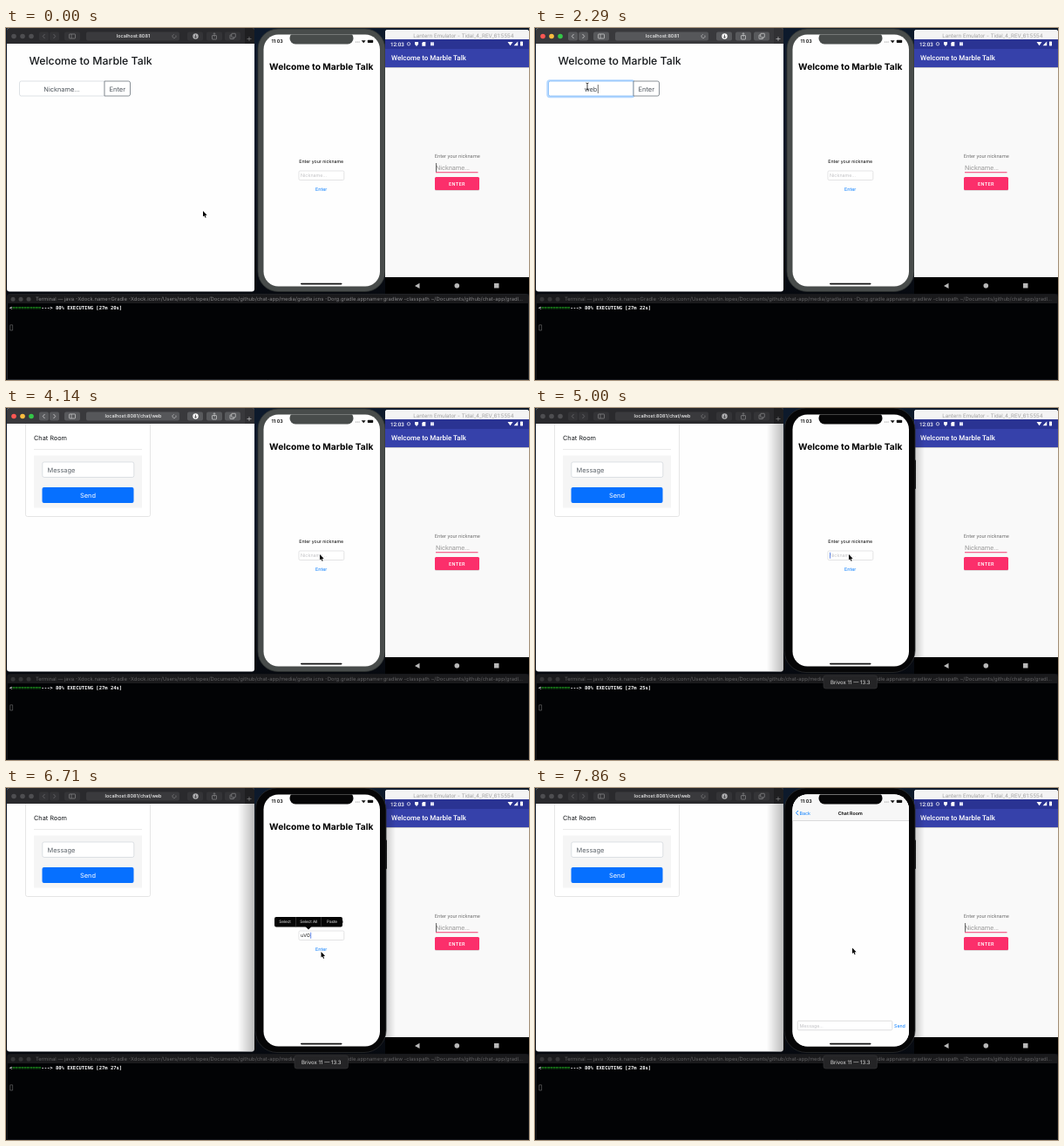
Recreate the animation shown at these times as an HTML page with a canvas. Size 600 by 404 pixels, loop 8 s.

```html
<!DOCTYPE html>
<html lang="en">
<head>
<meta charset="utf-8">
<title>Chat on three screens</title>
<style>
html, body { margin: 0; width: 600px; height: 404px; overflow: hidden; background: #05070c; }
canvas { display: block; width: 600px; height: 404px; }
</style>
</head>
<body>
<canvas></canvas>
<script>
const canvas = document.querySelector('canvas');
const ctx = canvas.getContext('2d');
const ratio = window.devicePixelRatio || 1;
canvas.width = 600 * ratio;
canvas.height = 404 * ratio;
ctx.textRendering = 'geometricPrecision';

const LOOP = 8000, STEP = LOOP / 56;
const SANS = 'Inter, sans-serif', ROBOTO = 'Roboto, sans-serif', MONO = '"DejaVu Sans Mono", monospace';
const WELCOME = 'Welcome to Marble Talk';
const BLUE = '#007aff';

// Moments of the session, in ms
const browserFocus = 1000, fieldFocus = 1420, chatOpen = 3420, phoneFocus = 4280, phoneTap = 4560;
const menuOpen = 6280, pushStart = 6850, pushEnd = 7420;

// Pointer path: time, x, y
const path = [
  [140, 226, 210], [1000, 60, 67], [2570, 60, 67], [2990, 128, 69], [3420, 128, 69],
  [3990, 360, 168], [6280, 360, 168], [6570, 361.5, 188], [7000, 361.5, 188], [7420, 364, 183.5]
];

const clamp = v => Math.min(1, Math.max(0, v));
const ease = v => v * v * (3 - 2 * v);
const typed = (word, times, t) => word.slice(0, times.filter(at => t >= at).length);

function box(x, y, w, h, fill, r = 0, stroke, line = 0.7) {
  ctx.beginPath();
  ctx.roundRect(x, y, w, h, r);
  if (fill) { ctx.fillStyle = fill; ctx.fill(); }
  if (stroke) { ctx.strokeStyle = stroke; ctx.lineWidth = line; ctx.stroke(); }
}

function dot(x, y, r, fill, stroke) {
  box(x - r, y - r, 2 * r, 2 * r, fill, r, stroke);
}

function poly(points, fill, stroke, line = 0.8) {
  ctx.beginPath();
  for (let i = 0; i < points.length; i += 2) ctx.lineTo(points[i], points[i + 1]);
  if (fill) { ctx.closePath(); ctx.fillStyle = fill; ctx.fill(); }
  if (stroke) { ctx.strokeStyle = stroke; ctx.lineWidth = line; ctx.stroke(); }
}

// y is the middle of the capitals
function text(s, x, y, size, color, { font = SANS, weight = 400, align = 'left', spacing = 0 } = {}) {
  ctx.font = `${weight} ${size}px ${font}`;
  ctx.textAlign = align;
  ctx.letterSpacing = spacing + 'px';
  ctx.fillStyle = color;
  ctx.fillText(s, x, y + size * 0.36);
  return ctx.measureText(s).width;
}

const middle = (s, x, y, size, color, weight) => text(s, x, y, size, color, { align: 'center', weight });

function fade(x0, x1, y, h, from, to) {
  const g = ctx.createLinearGradient(x0, 0, x1, 0);
  g.addColorStop(0, from);
  g.addColorStop(1, to);
  box(Math.min(x0, x1), y, Math.abs(x1 - x0), h, g);
}

function desktop() {
  const g = ctx.createLinearGradient(0, 0, 0, 310);
  g.addColorStop(0, '#0d1a2c');
  g.addColorStop(0.5, '#121a28');
  g.addColorStop(1, '#06090f');
  box(0, 0, 600, 404, g);
}

function toolbar(t) {
  const active = t >= browserFocus && t < phoneFocus;
  const icon = active ? '#d4d4d5' : '#8a8a8c', button = active ? '#58595c' : '#343437';
  box(1, 0, 284, 18, active ? '#39393c' : '#2a2a2d', [3, 3, 0, 0]);
  ['#fc5753', '#fdbc40', '#34c648'].forEach((color, i) => dot(9 + i * 10, 9.5, 2.8, active ? color : '#4e4e51'));
  box(38, 4.5, 11, 10, button, 2);
  box(50, 4.5, 11, 10, button, 2);
  poly([44.5, 7, 42.3, 9.5, 44.5, 12], null, active ? icon : '#69696c');
  poly([54.5, 7, 56.7, 9.5, 54.5, 12], null, active ? icon : '#69696c');
  [67, 208, 230, 251].forEach(x => box(x, 4.5, 18, 10, button, 2));
  box(72.5, 7, 7, 5, null, 0.6, icon);
  poly([75, 7, 75, 12], null, icon, 0.6);
  box(92, 4.5, 107, 10, active ? '#56575a' : '#3a3a3d', 2);
  middle(t < chatOpen ? 'localhost:8081' : 'localhost:8081/chat/web', 146, 9.5, 5.5, '#f2f2f2', 500);
  ctx.beginPath();
  ctx.arc(193, 9.5, 2.1, -0.5, 4.6);
  ctx.strokeStyle = icon;
  ctx.lineWidth = 0.6;
  ctx.stroke();
  dot(217.5, 9.5, 3.2, active ? '#fff' : '#b0b0b2');
  poly([217.5, 7.7, 217.5, 11.2], null, '#39393c');
  poly([216, 9.8, 217.5, 11.3, 219, 9.8], null, '#39393c');
  box(236.5, 8.5, 5, 4.5, null, 0.5, icon);
  poly([237.7, 7, 239, 5.6, 240.3, 7], null, icon, 0.6);
  poly([239, 5.8, 239, 10.5], null, icon, 0.6);
  box(257, 8, 4.5, 4.5, null, 0.5, icon);
  box(258.8, 6.3, 4.5, 4.5, button, 0.5, icon);
  box(274, 0, 11, 18, active ? '#313134' : '#1f1f21', [0, 3, 0, 0]);
  poly([276.5, 12.5, 281.5, 12.5], null, icon, 0.6);
  poly([279, 10, 279, 15], null, icon, 0.6);
}

function loginPage(t, hover) {
  text(WELCOME, 26.5, 38, 12.3, '#15181b', { weight: 500 });
  const focused = t >= fieldFocus;
  if (focused) box(14.5, 60.5, 99, 18.5, null, 2.5, '#b5d8ff', 2.4);
  box(15.5, 61, 97.5, 17, '#fff', [2, 0, 0, 2], focused ? '#70b2f8' : '#ced4da');
  const name = typed('web', [1710, 1850, 2140], t);
  const width = middle(name || 'Nickname...', 64, 70, 7.4, '#495057');
  if (focused) box(64.5 + (name ? width / 2 : 0), 65, 0.7, 10, '#333');
  box(113, 61, 29.5, 17, hover ? '#6c757d' : '#fff', [0, 2, 2, 0], '#6c757d', 0.8);
  middle('Enter', 127.8, 70, 7.5, hover ? '#fff' : '#50575e');
  if (hover) {
    box(2, 291, 72, 10.5, '#48484a', 2);
    const w = text('localhost:8081', 5, 296, 5.5, '#fff', { weight: 700 });
    text('/chat/web', 5 + w, 296, 5.5, '#e0e0e0');
  }
}

function chatPage() {
  box(22.5, 10, 143, 114.5, '#fff', 2, '#dcdcdc');
  text('Chat Room', 32, 34.5, 7.3, '#15181b');
  box(32, 47.3, 124, 0.7, '#e3e3e3');
  box(32, 54.5, 124, 60, '#f5f5f5');
  box(41.8, 62, 105, 17.5, '#fff', 2, '#ced4da');
  text('Message', 47.5, 71, 7.4, '#5a6168');
  box(41.5, 91, 105, 18, '#0670ff', 2);
  middle('Send', 94, 100, 7.4, '#fff');
}

function browser(t, hover) {
  box(1, 0, 284, 302.5, '#fefefe', 3);
  t < chatOpen ? loginPage(t, hover) : chatPage();
  toolbar(t);
}

function terminal(t) {
  const active = t < browserFocus;
  box(1.5, 305.5, 598, 98, '#020305', [3, 3, 0, 0], active ? '#2c3036' : '#17191d', 0.8);
  box(1.5, 305.5, 598, 10.5, '#1a1a1c', [3, 3, 0, 0]);
  [8, 17, 26].forEach(x => dot(x, 311.2, 2.5, active ? '#454547' : '#343436'));
  text('Terminal — java -Xdock.name=Gradle -Xdock.icon=/Users/martin.lopes/Documents/github/chat-app/media/gradle.icns ' +
    '-Dorg.gradle.appname=gradlew -classpath ~/Documents/github/chat-app/gradl...',
    34, 311, 5.86, active ? '#858587' : '#626264');
  const mono = { font: MONO, weight: 700 };
  const seconds = 20 + Math.floor((t + 500) / 1000);
  let x = 4;
  for (const [part, color] of [['<', '#fff'], ['='.repeat(10), '#25b425'], [`---> 80% EXECUTING [27m ${seconds}s]`, '#fff']])
    x += text(part, x, 321, 5.5, color, mono);
  box(4.8, 340.8, 2.8, 6.2, null, 0, '#747474', 0.6);
}

function android(t) {
  box(435, 2, 165, 303, '#f9f9f9', [3, 3, 0, 0]);
  box(435, 2, 165, 11, '#f4f4f4', [3, 3, 0, 0]);
  middle('Lantern Emulator - Tidal_4_REV_61:5554', 525, 8.5, 6.1, '#a0a0a0');
  box(435, 45, 165, 1, '#c4c4ca');
  box(435, 13, 165, 11, '#2a3393');
  box(435, 24, 165, 21, '#3641aa');
  const roboto = (s, x, y, size, color, weight, spacing) => text(s, x, y, size, color, { font: ROBOTO, weight, spacing });
  roboto('12:03', 441, 18.5, 6.2, '#fff', 500);
  dot(462, 18.3, 1.7, null, '#fff');
  poly([469, 16, 473, 16, 473, 18.8, 471, 21, 469, 18.8], '#fff');
  poly([478.3, 16, 481.3, 16, 481.3, 20.8, 477.3, 20.8, 477.3, 17.2], '#fff');
  box(487, 16.3, 4, 4, '#dfe2f5');
  poly([575.5, 16, 581.5, 16, 578.5, 20.3], '#fff');
  poly([587.2, 15.5, 587.2, 20.3, 582.6, 20.3], '#fff');
  box(590, 15.5, 3, 5, '#fff', 0.4);
  roboto(WELCOME, 442, 34.2, 8, '#fff', 500);
  roboto('Enter your nickname', 491.7, 147, 5.75, '#757575');
  roboto('Nickname...', 493, 160, 7.4, '#9a9a9a');
  if ((t + 450) % 990 < 480) box(493, 155, 0.8, 10.5, '#444');
  box(493, 165.3, 48.5, 0.9, '#f23a70');
  box(492, 171.8, 51, 15, 'rgba(0,0,0,.16)', 1.5);
  box(492, 171, 51, 15, '#fb2f6b', 1.5);
  roboto('ENTER', 508, 178.6, 5.6, '#fff', 500, 0.35);
  box(435, 286, 165, 19, '#000');
  poly([474.5, 292.8, 474.5, 299, 469, 295.9], '#b8b8b8');
  dot(517.3, 295.8, 2.8, '#b8b8b8');
  box(560, 293, 5.5, 5.5, '#b8b8b8');
}

function phoneLogin(t) {
  middle(WELCOME, 361.7, 44, 10.2, '#000', 700);
  middle('Enter your nickname', 361.7, 152.7, 5.25, '#000');
  box(336, 164, 51.8, 10.5, '#fff', 1.3, '#d8d8da');
  const name = typed('uVO', [5700, 5850, 6000], t);
  const width = text(name || 'Nickname...', 338, 169.2, 5.4, name ? '#111' : '#c2c2c5');
  if (t >= phoneTap) box(338 + (name ? width + 0.5 : 0), 165.8, 0.8, 7, '#3f6ee8');
  middle('Enter', 361.7, 185.5, 5.4, BLUE);
  if (t >= menuOpen) {
    box(308, 148, 78, 11.5, '#050505', 2);
    poly([343.5, 159, 350.5, 159, 347, 162.5], '#050505');
    middle('Select', 320, 153.7, 4.6, '#eee');
    middle('Select All', 347.3, 153.7, 4.6, '#eee');
    middle('Paste', 374, 153.7, 4.6, '#eee');
    box(332, 148, 0.5, 11.5, '#555');
    box(361.5, 148, 0.5, 11.5, '#555');
  }
}

function phoneChat() {
  box(295, 7, 135, 291, '#fefefe');
  box(295, 7, 135, 30.5, '#f7f7f7');
  box(295, 37.2, 135, 0.5, '#bcbcbe');
  poly([302, 26, 299.6, 28.6, 302, 31.2], null, BLUE, 0.9);
  text('Back', 303.5, 28.7, 5.3, BLUE);
  middle('Chat Room', 361.7, 28.7, 5.3, '#000', 600);
  box(301.3, 267.3, 108.5, 10.5, '#fff', 1.3, '#d0d0d2');
  text('Message...', 303.5, 272.6, 5.3, '#c2c2c5');
  text('Send', 412, 272.6, 5.3, BLUE);
}

function phone(t) {
  const active = t >= phoneFocus;
  const shell = active ? '#060607' : '#484c4b';
  if (active) {
    fade(266, 286, 18, 284, 'rgba(0,0,0,0)', 'rgba(0,0,0,.28)');
    fade(447, 436, 14, 272, 'rgba(0,0,0,0)', 'rgba(0,0,0,.18)');
    box(434, 59.5, 3, 33.5, '#0a0a0b', 1);
    box(286, 0, 150, 303.5, shell, 25, '#2a2b2d', 0.8);
  } else {
    box(289, 1, 146, 301.5, shell, 23, '#2c302f', 0.8);
  }
  ctx.save();
  box(295.5, 7.5, 133.5, 289, '#fefefe', 17);
  ctx.clip();
  const push = 1 - (1 - clamp((t - pushStart) / (pushEnd - pushStart))) ** 3;
  ctx.save();
  ctx.translate(-40 * push, 0);
  if (push < 1) phoneLogin(t);
  ctx.restore();
  if (push > 0) {
    ctx.save();
    ctx.translate(134.5 * (1 - push), 0);
    phoneChat();
    ctx.restore();
  }
  box(325.5, 5, 73, 13.5, shell, 6.5);
  text('11:03', 304.5, 15.3, 5.4, '#000', { weight: 600 });
  [401.5, 403.3, 405.1].forEach(x => dot(x, 16, 0.5, '#777'));
  poly([407.7, 14.2, 412.7, 14.2, 410.2, 17.3], '#111');
  box(414.8, 13.7, 6.4, 3.4, '#111', 0.8);
  box(338, 292.8, 47.5, 1.6, '#111', 0.8);
  ctx.restore();
  if (active) {
    box(331, 307, 61.5, 15, '#242426', 2.5, '#38383a', 0.6);
    middle('Brivox 11 — 13.3', 361.7, 314.7, 6.1, '#e2e2e2');
  }
}

function pointerAt(t) {
  let i = 0;
  while (i < path.length - 2 && t >= path[i + 1][0]) i++;
  const [t0, x0, y0] = path[i], [t1, x1, y1] = path[i + 1];
  const k = ease(clamp((t - t0) / (t1 - t0)));
  return [x0 + (x1 - x0) * k, y0 + (y1 - y0) * k];
}

function pointer(x, y, shape) {
  ctx.save();
  ctx.translate(x, y);
  if (shape === 'beam') {
    poly([0, -3.5, 0, 3.5], null, '#111');
    poly([-1.6, -4, 0, -3.3, 1.6, -4], null, '#111', 0.7);
    poly([-1.6, 4, 0, 3.3, 1.6, 4], null, '#111', 0.7);
  } else if (shape === 'hand') {
    poly([-0.7, -0.5, 0.6, -0.5, 0.8, 2, 3.6, 2.8, 3.4, 5.2, 2.6, 7, -0.7, 7, -2.6, 4, -2, 3.3, -0.7, 4.3, -0.7, -0.5], '#fff', '#111', 0.7);
  } else {
    const arrow = [0, 0, 0, 6.6, 1.5, 5.3, 2.6, 7.8, 3.6, 7.4, 2.6, 5, 4.6, 4.8, 0, 0];
    poly(arrow, null, '#fff', 1.2);
    poly(arrow, '#000');
  }
  ctx.restore();
}

function draw(now) {
  const t = Math.floor((now % LOOP + 20) / STEP) * STEP % LOOP;
  const [x, y] = pointerAt(t);
  const inRow = t < chatOpen && y > 61 && y < 79;
  const hover = inRow && x > 113 && x < 143;
  ctx.setTransform(ratio, 0, 0, ratio, 0, 0);
  desktop();
  browser(t, hover);
  terminal(t);
  const devices = [phone, android];
  if (t >= phoneFocus) devices.reverse();
  devices.forEach(device => device(t));
  pointer(x, y, hover ? 'hand' : inRow && x > 15 && x < 113 ? 'beam' : 'arrow');
}

let start;
function tick(now) {
  start ??= now;
  draw(now - start);
  requestAnimationFrame(tick);
}
requestAnimationFrame(tick);
</script>
</body>
</html>
```
